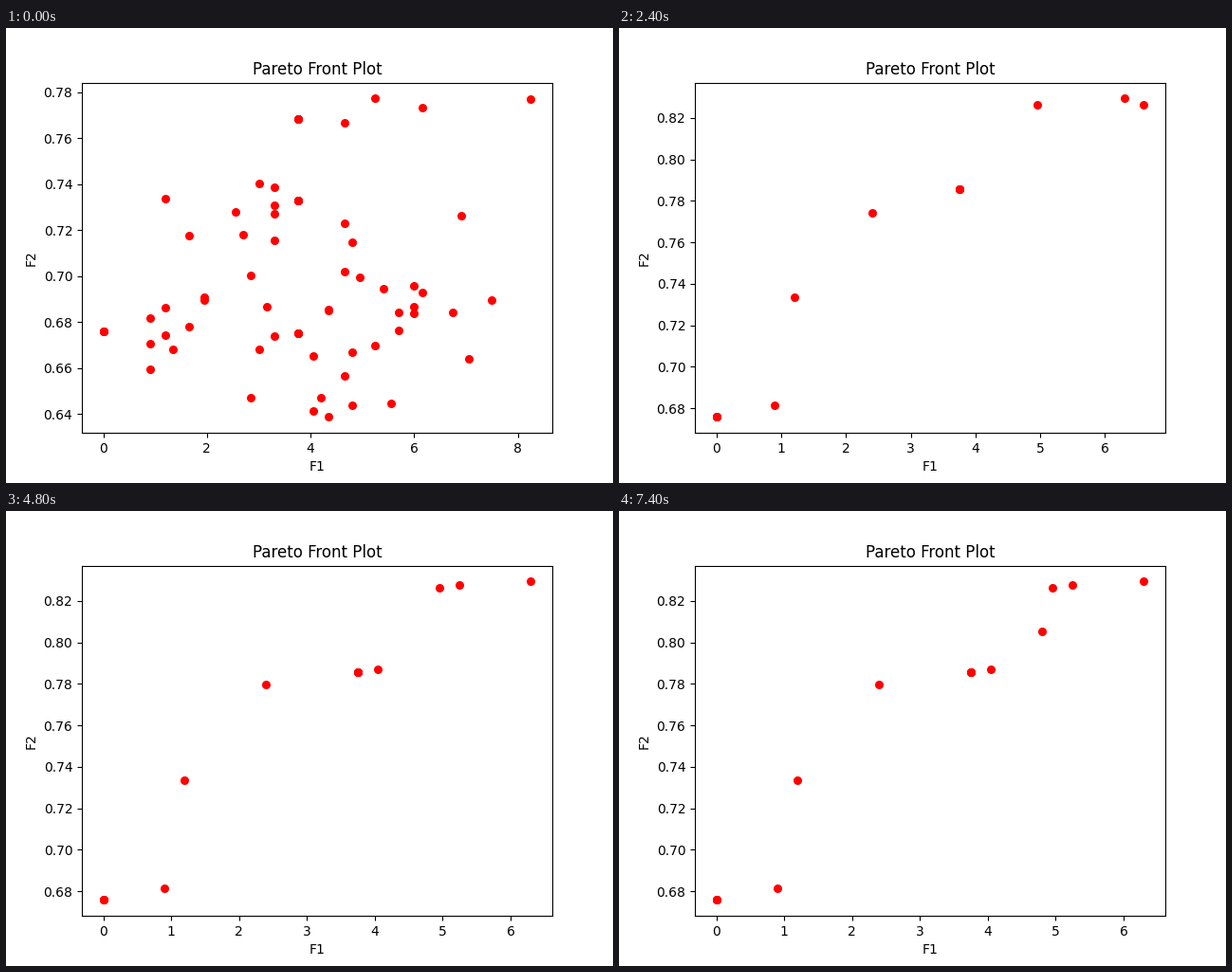
These frames come from a looping animation (640 px wide and 480 px high, 7.8 s). A matplotlib script:

```python
import matplotlib.pyplot as plt
import numpy as np
from matplotlib.animation import FuncAnimation

LOOP, TICK = 7800, 200      # ms
STEP = 0.15                 # F1 moves on this lattice
END = LOOP + 1
CROWDED = (0, 3.75)         # F1 values where several solutions coincide
COPIES = 4

rng = np.random.default_rng(4)

# Upper edge of the early population
EDGE = [(0, .6758), (.9, .6816), (1.2, .7336), (2.55, .7279), (2.7, .7368),
        (3.75, .7682), (4.05, .7739), (4.65, .7669), (5.1, .7795),
        (5.7, .7786), (6.3, .8201), (6.6, .8260), (7.65, .7908),
        (7.8, .7804)]

# Converged front: F1, F2, time it appears, time it is replaced
FRONT = [(0, .6758, 0, END), (.9, .6816, 0, END), (1.2, .7336, 0, END),
         (2.4, .7743, 0, 3400), (2.4, .7798, 3400, END),
         (3.75, .7857, 0, END), (4.05, .7872, 4200, END),
         (4.8, .8052, 5600, END), (4.95, .8263, 0, END),
         (5.25, .8277, 3400, END), (6.3, .8294, 0, END),
         (6.6, .8262, 0, 3000)]


def random_start(count=45):
    """A wide cloud on the F1 lattice around a few fixed solutions."""
    x = STEP * np.clip(np.round(rng.normal(29, 11, count)), 8, 50)
    y = .64 + .11 * rng.beta(1.3, 1.6, count)
    fixed = [(4.35, .6386), (5.25, .7773), (6.15, .7733), (8.25, .7770)]
    shared = [p for p in EDGE if p[0] in (0, 1.2, 2.55, 3.75, 4.65)]
    return shared + fixed + column + list(zip(x, y))


def laggards(count=7):
    """Solutions on or below the early edge."""
    xs, ys = zip(*EDGE)
    filled = [(x, np.interp(x, xs, ys)) for x in (5.25, 5.4)]
    x = STEP * rng.integers(8, 30, count)
    y = np.interp(x, xs, ys) - rng.uniform(.01, .05, count)
    return filled + list(zip(x, np.maximum(y, .665)))


def narrow(points, slack):
    """Keep points at most slack below the best F2 at no greater F1."""
    return [(x, y) for x, y in points
            if y >= max(b for a, b in points if a <= x) - slack]


column = [(.9, .6816 - .0112 * k) for k in range(3)]
start = random_start()
selected = EDGE + column[1:] + laggards()

STAGES = [(0, start), (600, narrow(start + EDGE, .04)), (1000, selected),
          (1600, narrow(selected, .04)), (2000, narrow(EDGE, 0))]


def population(t):
    if t >= 2400:
        return [(x, y) for x, y, born, gone in FRONT if born <= t < gone]
    return [points for begin, points in STAGES if begin <= t][-1]


fig, ax = plt.subplots(figsize=(6.4, 4.8), dpi=100)


def draw(i):
    points = population(i * TICK)
    points = points + [p for p in points if p[0] in CROWDED] * (COPIES - 1)
    ax.clear()
    ax.scatter(*zip(*points), s=30, c="red")
    ax.set_title("Pareto Front Plot")
    ax.set_xlabel("F1")
    ax.set_ylabel("F2")
    return ax.collections


anim = FuncAnimation(fig, draw, frames=LOOP // TICK, interval=TICK,
                     repeat=True, repeat_delay=0, blit=False)
plt.show()
```
